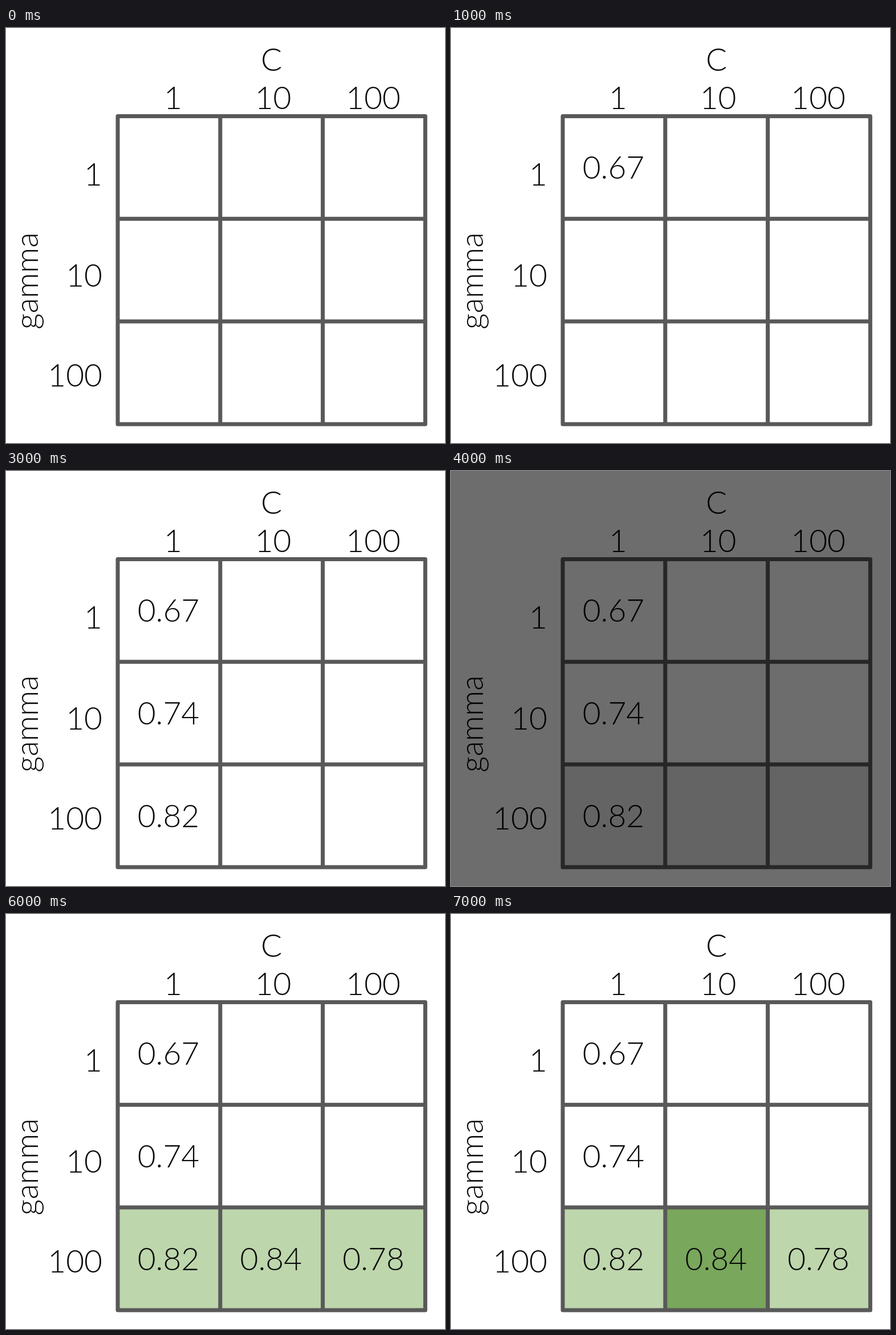
These frames come from a looping animation (770 px wide and 727 px high, 8000 ms). An HTML page:

```html
<!DOCTYPE html>
<html lang="en">
<head>
<meta charset="utf-8">
<title>Grid search</title>
<style>
html, body { margin: 0; width: 100%; height: 100%; overflow: hidden; background: #fff; }
svg { display: block; }
text { font: 300 55px Lato, sans-serif; fill: #0b0b0b; text-anchor: middle; }
.end { text-anchor: end; }
.dim text { fill: #000; }
</style>
</head>
<body>
<svg id="stage" width="770" height="727" viewBox="0 0 770 727"></svg>
<script>
const LOOP = 8000;
const LEFT = 196, TOP = 154.5, CELL = 179.8;
const stage = document.getElementById('stage');

function add(tag, attrs, text = '') {
  const node = document.createElementNS('http://www.w3.org/2000/svg', tag);
  for (const key in attrs) node.setAttribute(key, attrs[key]);
  node.textContent = text;
  return stage.appendChild(node);
}

const cell = (col, row, cols = 1) => add('rect', {
  x: LEFT + col * CELL, y: TOP + row * CELL, width: cols * CELL, height: CELL
});

const page = add('rect', { width: 770, height: 727 });
const bestRow = cell(0, 2, 3);
const bestCell = cell(1, 2);
bestCell.setAttribute('fill', '#79a75c');

let path = '';
for (let i = 0; i < 4; i++) {
  const x = LEFT + i * CELL, y = TOP + i * CELL;
  path += `M${x} ${TOP}v${3 * CELL}M${LEFT} ${y}h${3 * CELL}`;
}
const grid = add('path', { d: path, 'stroke-width': 7, 'stroke-linecap': 'round' });

add('text', { x: 465.5, y: 75 }, 'C');
add('text', { transform: 'translate(56 443) rotate(-90)' }, 'gamma');
[['1', 309, 276], ['10', 500.5, 453], ['100', 692, 627.5]].forEach(([label, x, y]) => {
  add('text', { x, y: 142, class: 'end' }, label);
  add('text', { x: 169, y, class: 'end' }, label);
});

const scores = [
  ['0.67', 0, 0, 1000],
  ['0.74', 0, 1, 2000],
  ['0.82', 0, 2, 3000],
  ['0.84', 1, 2, 5000],
  ['0.78', 2, 2, 6000]
].map(([label, col, row, start]) => ({
  start,
  node: add('text', { x: 285 + col * CELL, y: 264 + row * CELL }, label)
}));

const show = (node, visible) => node.setAttribute('visibility', visible ? 'visible' : 'hidden');

function draw(now) {
  const time = now % LOOP;
  const dim = time >= 4000 && time < 5000;
  stage.setAttribute('class', dim ? 'dim' : '');
  page.setAttribute('fill', dim ? '#6d6d6d' : '#fff');
  grid.setAttribute('stroke', dim ? '#272727' : '#595959');
  bestRow.setAttribute('fill', dim ? '#646464' : '#bdd6ac');
  show(bestRow, time >= 4000);
  show(bestCell, time >= 7000);
  scores.forEach(({ start, node }) => show(node, time >= start));
}

const origin = performance.now();
function tick() {
  draw(performance.now() - origin);
  requestAnimationFrame(tick);
}
tick();
</script>
</body>
</html>
```
